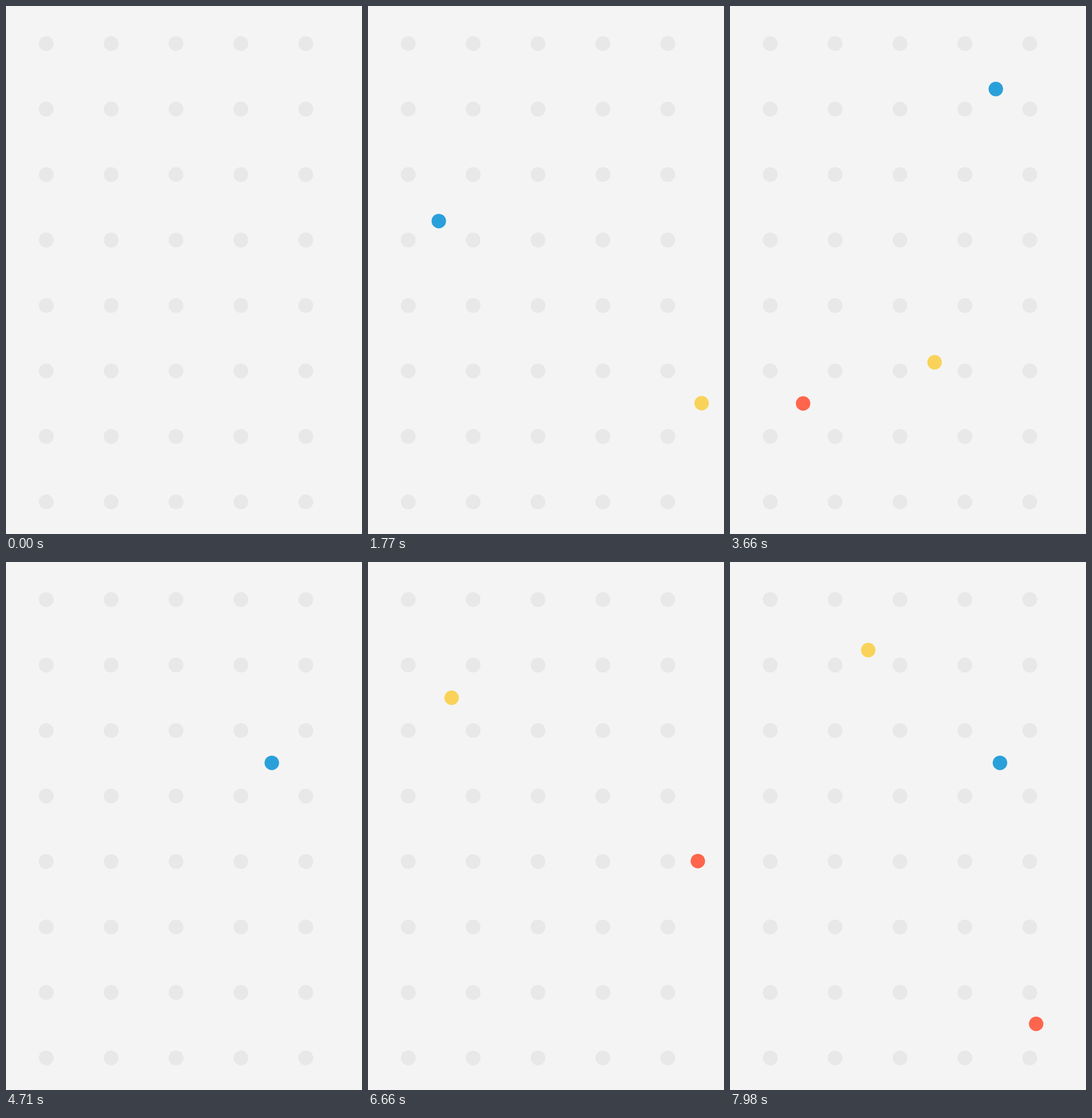
Write an HTML page that moves like this. It is 615x910 px and loops after 8 s.

```html
<!DOCTYPE html>
<html lang="en">
<head>
<meta charset="utf-8">
<title>Dots on a grid</title>
<style>
  html, body { margin: 0; width: 100%; height: 100%; overflow: hidden; background: #f4f4f4; }
  svg { display: block; width: 615px; height: 910px; }
  #grid { fill: #e8e8e8; }
</style>
</head>
<body>
<svg id="stage" viewBox="0 0 615 910"><g id="grid"></g></svg>
<script>
const LOOP = 8000;
const TICK = 30;
const LEFT = -20, TOP = -20, RIGHT = 635, BOTTOM = 930; // just off stage

const stage = document.getElementById('stage');
const grid = document.getElementById('grid');

function circle(parent, x, y, r) {
  const c = document.createElementNS('http://www.w3.org/2000/svg', 'circle');
  parent.appendChild(c);
  c.setAttribute('r', r);
  put(c, x, y);
  return c;
}

function put(node, x, y) {
  node.setAttribute('cx', x.toFixed(2));
  node.setAttribute('cy', y.toFixed(2));
}

const ease = p => p < 0.5 ? 4 * p ** 3 : 1 - 4 * (1 - p) ** 3;

// A dot slides along one axis at a time; start and span are in ticks.
class Dot {
  constructor(color) {
    this.moves = [];
    this.node = circle(stage, LEFT, TOP, 12.5);
    this.node.setAttribute('fill', color);
  }
  enter(x, y) {
    this.end = { x, y };
    return this;
  }
  slide(axis, start, span, to) {
    const from = this.end;
    this.end = { ...from, [axis]: to };
    this.moves.push({ start, span, from, to: this.end });
    return this;
  }
  x(...move) { return this.slide('x', ...move); }
  y(...move) { return this.slide('y', ...move); }
  draw(tick) {
    const move = this.moves.findLast(m => tick >= m.start) || this.moves[0];
    const { start, span, from, to } = move;
    const k = ease(Math.max(0, Math.min(1, (tick - start) / span)));
    put(this.node, from.x + (to.x - from.x) * k, from.y + (to.y - from.y) * k);
  }
}

for (let col = 0; col < 5; col++)
  for (let row = 0; row < 8; row++)
    circle(grid, 69.5 + col * 112.1, 64.8 + row * 112.85, 12.8);

const dots = [
  new Dot('#2aa0da')
    .enter(LEFT, 119.5).x(14, 32, 122.3).y(45.55, 28, 686).x(73, 11.5, LEFT)
    .enter(RIGHT, 122).x(82, 14.7, 459.2).y(107.1, 52, 346.2).x(163, 34, RIGHT)
    .x(241, 32, 459),
  new Dot('#f9d359')
    .enter(577.4, BOTTOM).y(12.5, 32, 684.5).x(54.6, 42, 353.4).y(106.8, 52, TOP)
    .enter(126.3, BOTTOM).y(165, 35, 234).x(210, 35, 238.8).y(245, 35.5, 121),
  new Dot('#ff654d')
    .enter(126.3, BOTTOM).y(94.5, 28, 685).x(140.5, 21.4, LEFT)
    .enter(569.8, TOP).y(198.2, 42.6, 796).x(249.5, 36.5, 459)
];

const began = performance.now();

function draw() {
  const time = (performance.now() - began) % LOOP;
  const tick = Math.floor((time + 2) / TICK);
  for (const dot of dots) dot.draw(tick);
  requestAnimationFrame(draw);
}
draw();
</script>
</body>
</html>
```
